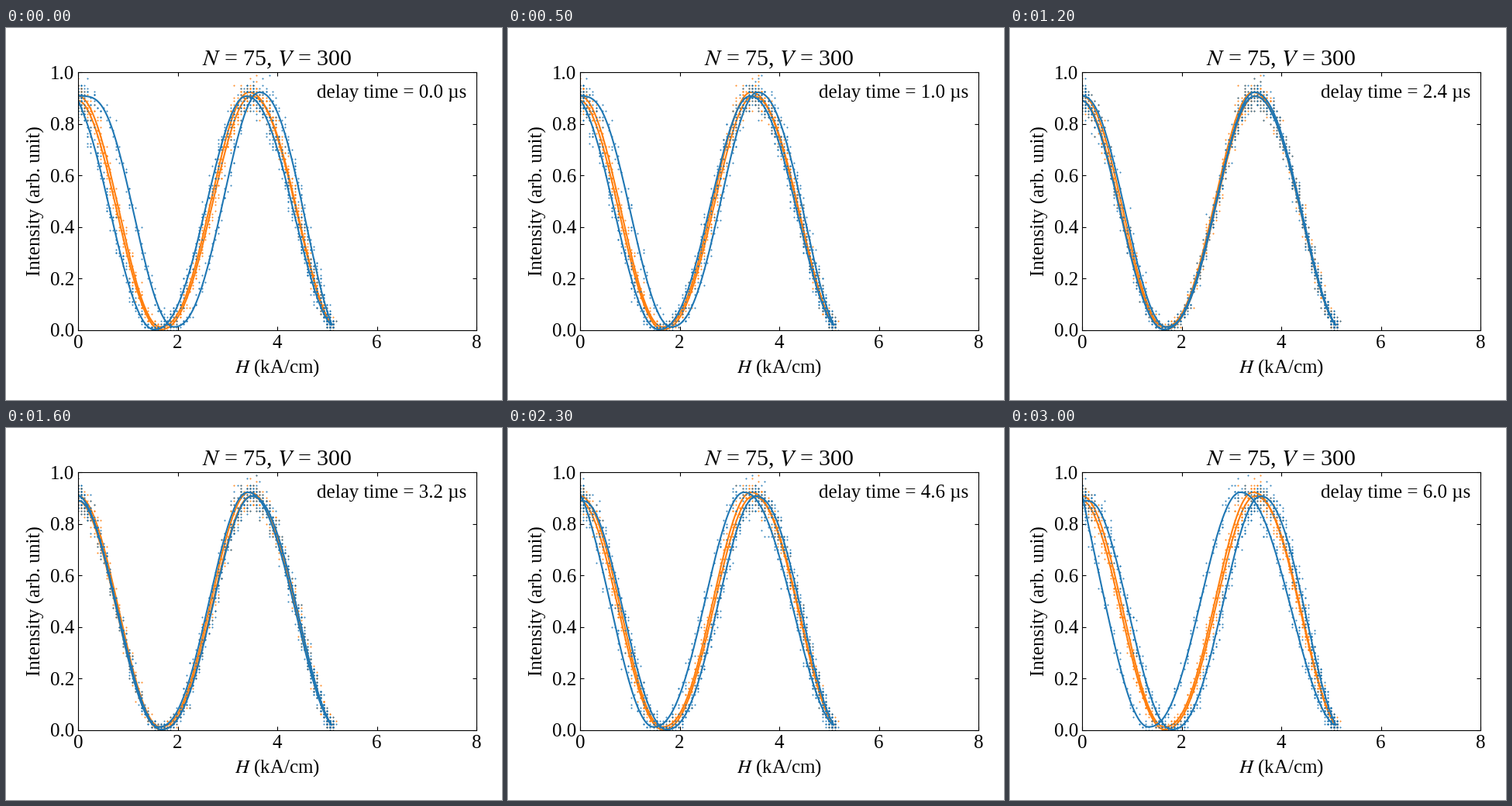
A matplotlib script for the animation above (3100 ms loop, 640 by 480 pixels).

```python
import numpy as np
import matplotlib.pyplot as plt
from matplotlib.animation import FuncAnimation

plt.rcParams.update({
    "font.family": "Liberation Serif",
    "font.size": 18,
    "mathtext.fontset": "stix",
    "xtick.direction": "in",
    "ytick.direction": "in",
    "xtick.top": True,
    "ytick.right": True,
    "xtick.major.pad": 4.6,
})

BLUE, ORANGE = "tab:blue", "tab:orange"
STEP = 0.2            # sampling step, us
ALIGNED = 14          # delay in samples at which field and signal match
H_MAX = 5.09          # kA/cm
RISE, FALL, REST = 77.0, 164.0, 9.0   # pulse timing, us
SOFT = 1.5            # rounding of the pulse edges, us
H_BIT, I_BIT = 0.064, 0.0125          # field and intensity resolution


def ramp(time):
    """Straight ramp that leaves zero with a rounded corner."""
    return SOFT * np.logaddexp(0, time / SOFT)


def fringes(h, turns, levels, bends):
    """Cosine swings between the levels reached at the turning fields."""
    i = np.clip(np.searchsorted(turns, h) - 1, 0, len(bends) - 1)
    turns, levels, bends = map(np.array, (turns, levels, bends))
    u = np.clip((h - turns[i]) / (turns[i + 1] - turns[i]), 0, 1) ** bends[i]
    return levels[i] + (levels[i + 1] - levels[i]) * (1 - np.cos(np.pi * u)) / 2


t = np.arange(-REST, RISE + FALL + REST, STEP)
rising = t < RISE
phase = np.where(rising, ramp(t) / RISE, ramp(RISE + FALL - t) / FALL)
field = H_MAX * np.sin(np.pi / 2 * np.clip(phase, 0, 1))
signal = np.where(
    rising,
    fringes(field, [0, 1.65, 3.43, 5.25], [0.908, 0.013, 0.922, 0],
            [1, 1.16, 1.08]),
    fringes(field, [0, 1.655, 3.475, 5.25], [0.89, 0.003, 0.907, 0],
            [0.95, 1.16, 1.08]))

rng = np.random.default_rng(7)
raw_field = np.abs(np.round(field / H_BIT + rng.normal(0, 0.5, t.size))) * H_BIT
noise = rng.normal(0, 1, t.size) * (0.01 + 0.018 * signal)
raw_signal = np.abs(np.round((signal + noise) / I_BIT)) * I_BIT

fig = plt.figure(figsize=(6.4, 4.8), dpi=100)
ax = fig.add_axes([93 / 640, 90 / 480, 514 / 640, 333 / 480])
ax.set(xlim=(0, 8), ylim=(0, 1), xticks=range(0, 9, 2),
       yticks=np.arange(0, 1.01, 0.2))
ax.set_title("$N$ = 75, $V$ = 300")
ax.set_xlabel("$H$ (kA/cm)", labelpad=5.2)
ax.set_ylabel("Intensity (arb. unit)", labelpad=5.1)
label = ax.text(0.6, 0.9, "", transform=ax.transAxes)


def draw_pair(color, z):
    dots, = ax.plot(raw_field, raw_signal, "+", ms=2, mew=0.8, color=color,
                    alpha=0.85, zorder=z)
    line, = ax.plot(field, signal, lw=1.5, color=color, zorder=z + 0.1)
    return dots, line


draw_pair(ORANGE, 2)
dots, line = draw_pair(BLUE, 2.2)


def update(k):
    shift = k - ALIGNED
    dots.set_xdata(np.roll(raw_field, shift))
    line.set_xdata(np.roll(field, shift))
    label.set_text(f"delay time = {k * STEP:.1f} µs")
    return dots, line, label


anim = FuncAnimation(fig, update, frames=31, interval=100, repeat=True,
                     repeat_delay=0, blit=False)
plt.show()
```
